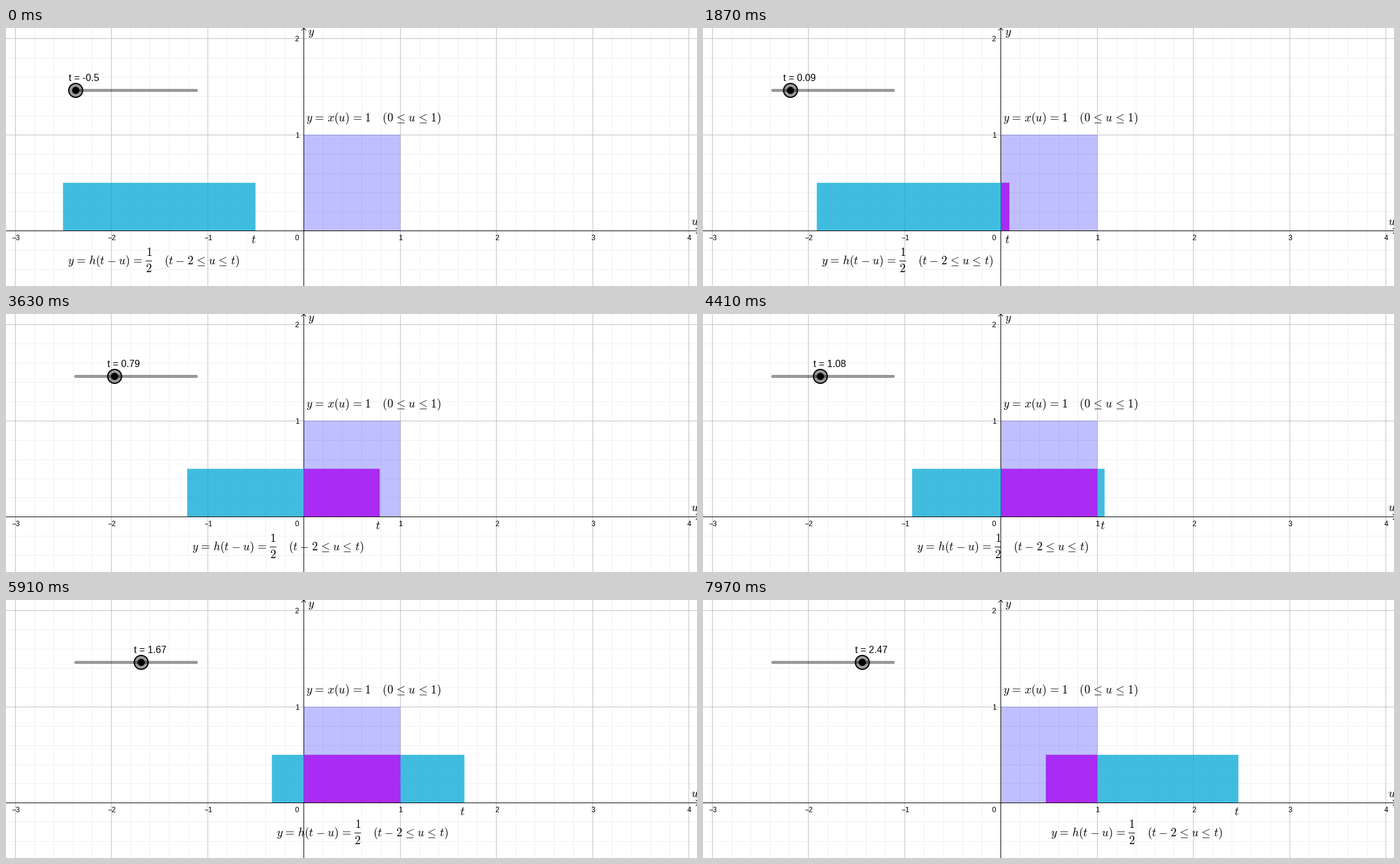
Write a matplotlib script that moves like this. It is 1145 px wide and 428 px high and loops after 8000 ms.

```python
import matplotlib.pyplot as plt
from matplotlib.animation import FuncAnimation
from matplotlib.patches import Circle, Rectangle

W, H, DPI = 1145, 428, 64
PX = 72 / DPI                      # points per pixel
LOOP, INTERVAL = 8000, 40
STEPS = 117                        # the slider advances in visible steps
X0, Y0, UNIT = 493.4, 336.4, 159.5
MATH = 19.3

plt.rcParams["mathtext.fontset"] = "cm"
plt.rcParams["font.family"] = "Liberation Sans"

fig = plt.figure(figsize=(W / DPI, H / DPI), dpi=DPI, facecolor="white")
ax = fig.add_axes([0, 0, 1, 1])
ax.set_xlim(0, W)
ax.set_ylim(H, 0)
ax.set_autoscale_on(False)
ax.axis("off")


def line(xs, ys, color="black", width=1, z=2, **kw):
    artist, = ax.plot(xs, ys, color=color, lw=width * PX, zorder=z,
                      snap=False, **kw)
    return artist


def box(x, y, w, h, color, alpha, z):
    return ax.add_patch(Rectangle((x, y), w, h, fc=color, alpha=alpha,
                                  lw=0, zorder=z, snap=False))


def text(x, y, s, size=MATH, ha="left", z=8):
    return ax.text(x, y, s, fontsize=size * PX, ha=ha, va="baseline",
                   color="black", zorder=z)


def formula(s):
    """Math text with the wider operator spacing of TeX."""
    for op, pad in (("=", 0.117), (r"\leq", 0.117), ("-", 0.053)):
        gap = r"\hspace{%.3f}" % pad
        s = s.replace(op, f"{gap}{op} {gap}")
    return f"${s}$"


def draw_grid():
    for k in range(-15, 21):
        major = k % 5 == 0
        color, z = ("#c0c0c0", 1.5) if major else ("#f0f0f0", 1)
        x = round(X0 + k * UNIT / 5) + 0.5
        line([x, x], [0, H], color, z=z)
        y = round(Y0 - k * UNIT / 5) + 0.5
        if 0 < y < H:
            line([0, W], [y, y], color, z=z)


def draw_axes():
    line([493.5, 493.5], [0, H])
    line([0, W], [336.5, 336.5])
    line([490, 493.5, 497], [3.8, 0, 3.8])
    line([1143.5, 1147.5, 1143.5], [332, 336.5, 341])
    for k in range(-3, 5):
        if k:
            label = f"\u2212{-k}" if k < 0 else str(k)
            text(X0 + k * UNIT + 1, 352, label, 12, "center")
    text(482.3, 352, "0", 12, "center")
    text(482, 182, "1", 12, "center")
    text(482, 22, "2", 12, "center")
    text(499.5, 12, "$y$")
    text(1135, 327, "$u$")


draw_grid()
draw_axes()

# fixed unit pulse
box(494, 177, 159.5, 159, "#0000ff", 0.25, 3)
text(497, 155, formula(r"y=x(u)=1\hspace{1.14}(0\leq u\leq 1)"))

# sliding pulse and its overlap
pulse = box(0, 256.8, 2 * UNIT, 79.2, "#00a7d4", 0.75, 4)
overlap = box(0, 256.8, 0, 79.2, "#aa2bf3", 1, 5)

# labels that travel with the pulse: artist and offset from its right edge
riders = [
    (text(0, 357, "$t$", ha="center"), -3),
    (text(0, 391.5, formula("y=h(t-u)=")), -311.2),
    (text(0, 378.5, "$1$", ha="center"), -176.8),
    (text(0, 405, "$2$", ha="center"), -176.8),
    (text(0, 391.5, formula(r"(t-2\leq u\leq t)")), -151.6),
]
bar = line([0, 0], [386.5, 386.5], z=8, solid_capstyle="butt")

# slider
line([115.5, 315.5], [103.5, 103.5], width=5, z=6, alpha=0.4,
     solid_capstyle="round")
knob = [
    ax.add_patch(Circle((0, 103.5), 11.5, fc=(0, 0, 0, 0.4), ec="black",
                        lw=2 * PX, zorder=7)),
    ax.add_patch(Circle((0, 103.5), 6, fc="black", lw=0, zorder=7.1)),
]
readout = text(0, 88, "", 16)


def value_at(ms):
    step = int((ms + 30) * STEPS / LOOP)
    return round(-0.5 + 0.0267 * max(0, step - 4.78), 2) + 0.0


def update(i):
    t = value_at(i * INTERVAL)
    edge = X0 - 0.2 + UNIT * t

    left = edge - 2 * UNIT
    pulse.set_x(left)
    start, end = max(494, left), min(653.5, edge)
    overlap.set_x(start)
    overlap.set_width(max(0, end - start))

    for artist, offset in riders:
        artist.set_x(edge + offset)
    bar.set_xdata([edge - 182.2, edge - 171.4])

    x = 115.5 + 50 * (t + 0.5)
    for disc in knob:
        disc.center = (x, 103.5)
    readout.set_x(x - 11.9)
    readout.set_text(f"t = {t:g}")
    return [pulse, overlap, bar, readout, *knob, *(a for a, _ in riders)]


anim = FuncAnimation(fig, update, frames=LOOP // INTERVAL, interval=INTERVAL,
                     repeat=True, repeat_delay=0, blit=False)
plt.show()
```
